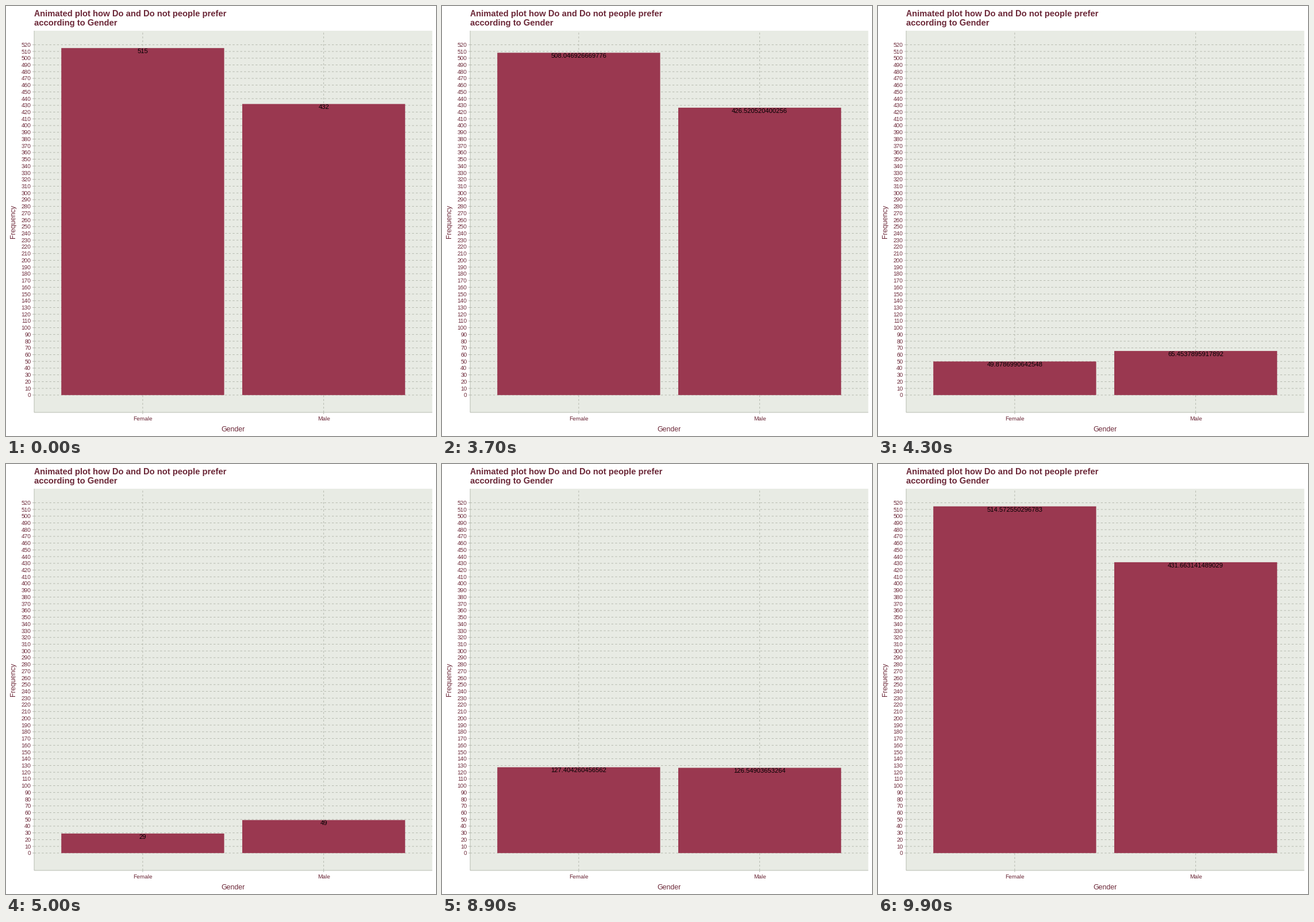
Write a matplotlib script that moves like this. It is 748 by 748 pixels and loops after 10 s.

```python
import math

import numpy as np
import matplotlib.pyplot as plt
from matplotlib.animation import FuncAnimation
from matplotlib.patches import Rectangle

SIZE, DPI = 748, 64
PX = 72 / DPI                     # points per pixel
LEFT, RIGHT, TOP, BOTTOM = 49, 741.5, 43, 707
PANEL, GRID, BAR, INK = "#E8EBE4", "#ABB0A4", "#9A3850", "#6B2737"

GENDERS = ("Female", "Male")
COUNTS = ((515, 432), (29, 49))   # bar heights in the two states
PAD = 0.05 * 515
HOLD, STEPS = 30, 21              # frames at rest, steps per transition
HALF = HOLD + STEPS - 1

plt.rcParams["font.family"] = "Liberation Sans"
plt.rcParams["text.hinting"] = "default"


def y_px(value):
    return TOP + (515 + PAD - value) * (BOTTOM - TOP) / (515 + 2 * PAD)


def x_px(pos):
    return LEFT + (pos - 0.4) * (RIGHT - LEFT) / 2.2


def elastic(p):
    """Elastic ease-in-out in single precision."""
    one = np.float32(1)
    twice = np.float32(2) * np.float32(p)
    power = float(np.float32(10) * (twice - one))
    if p < 0.5:
        wave = math.sin(13 * math.pi / 2 * float(twice))
        result = 0.5 * wave * 2 ** power
    else:
        wave = math.sin(-13 * math.pi / 2 * float((twice - one) + one))
        result = 0.5 * (wave * 2 ** -power + 2)
    return float(np.float32(result))


fig = plt.figure(figsize=(SIZE / DPI, SIZE / DPI), dpi=DPI, facecolor="white")
ax = fig.add_axes([0, 0, 1, 1])
ax.set_xlim(0, SIZE)
ax.set_ylim(SIZE, 0)
ax.axis("off")


def line(x0, y0, x1, y1, z, **style):
    ax.plot([x0, x1], [y0, y1], color=GRID, lw=0.83 * PX, zorder=z, snap=False,
            solid_capstyle="butt", dash_capstyle="butt", **style)


def box(x, y, w, h, color, z):
    return ax.add_patch(Rectangle((x, y), w, h, fc=color, lw=0, zorder=z, snap=False))


def write(x, y, s, size, ha="center", color=INK, **style):
    return ax.text(x, y, s, fontsize=size * PX, ha=ha, va="baseline",
                   color=color, zorder=5, **style)


panel = box(LEFT, TOP, RIGHT - LEFT, BOTTOM - TOP, PANEL, 0)

dashed = {"linestyle": (0, (4, 4))}
for tick in range(0, 521, 10):
    y = y_px(tick)
    line(LEFT, y, RIGHT, y, 1, **dashed)
    line(LEFT - 3, y, LEFT, y, 4)
    write(43.4, y + 3.5, str(tick), 10, ha="right")

bars, labels = [], []
for i, name in enumerate(GENDERS, 1):
    x = x_px(i)
    line(x, BOTTOM, x, TOP, 1, **dashed)
    line(x, BOTTOM, x, BOTTOM + 3, 4)
    write(x, 721, name, 10.1)
    bar = box(x_px(i - 0.45), 0, x_px(0.9) - x_px(0), 0, BAR, 2)
    label = write(x, 0, "", 11.15, color="black")
    for part in (bar, label):
        part.set_clip_path(panel)
    bars.append(bar)
    labels.append(label)

line(LEFT, TOP, LEFT, BOTTOM, 4)
line(LEFT, BOTTOM, RIGHT, BOTTOM, 4)

write(49, 18, "Animated plot how Do and Do not people prefer", 14.8, ha="left", weight="bold")
write(49, 34, "according to Gender", 14.8, ha="left", weight="bold")
write((LEFT + RIGHT) / 2, 739.5, "Gender", 12.4)
write(16, (TOP + BOTTOM) / 2, "Frequency", 12.4, rotation=90, rotation_mode="anchor")


def draw(frame):
    state, k = divmod(frame, HALF)
    step = max(0, k - HOLD + 1)
    ease = elastic(step / STEPS) if step else 0
    for bar, label, a, b in zip(bars, labels, COUNTS[state], COUNTS[1 - state]):
        value = a + (b - a) * ease
        y = y_px(value)
        bar.set_y(y)
        bar.set_height(y_px(0) - y)
        label.set_y(y + 9)
        label.set_text(f"{value:.15g}")
    return bars + labels


anim = FuncAnimation(fig, draw, frames=2 * HALF, interval=100, repeat=True,
                     repeat_delay=0, blit=False)
plt.show()
```
